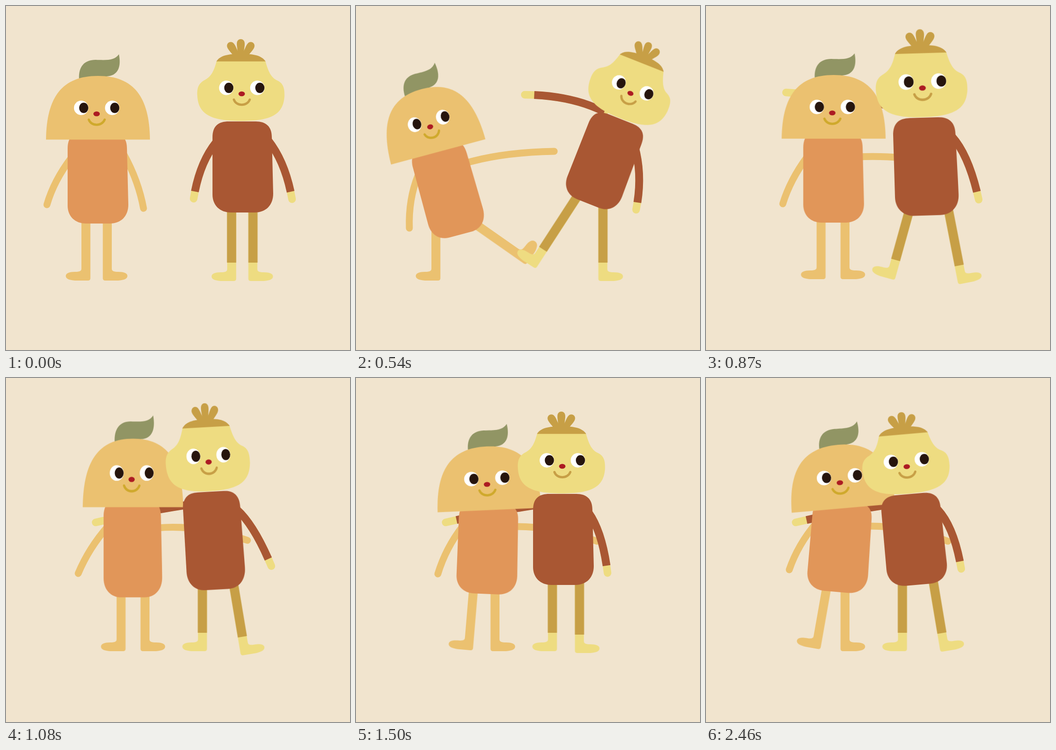
An HTML page without scripts for the animation above (2700 ms loop, 748 by 748 pixels).

```html
<!DOCTYPE html>
<html lang="en">
<head>
<meta charset="utf-8">
<title>Two friends</title>
<style>
html, body { margin: 0; width: 100%; height: 100%; overflow: hidden; background: #f1e4ce; }
svg { display: block; width: 100%; height: 100%; }

.mango { color: #cfa92c; fill: #ebc170; }
.onion { color: #c79f46; fill: #eedc81; }
.arm { fill: none; stroke: #ebc170; stroke-width: 15; stroke-linecap: round; }
.hand { stroke: #eedc81; stroke-width: 16.5; }
.sleeve { stroke: #a95733; stroke-width: 17; stroke-linecap: butt; stroke-dasharray: 88.5 100; }

.move { animation: 2.7s ease-in-out infinite; }
.m-body { animation-name: m-body; transform-origin: 200px 473px; }
.m-head { animation-name: m-head; transform-origin: 200px 290px; }
.m-leg-l { animation-name: m-leg-l; transform-origin: 173.5px 455px; }
.m-leg-r { animation-name: m-leg-r; transform-origin: 220.5px 455px; }
.m-arm-l { animation-name: m-arm-l; }
.m-arm-r { animation-name: m-arm-r; }
.o-body { animation-name: o-body; transform-origin: 515px 449px; }
.o-leg-l { animation-name: o-leg-l; transform-origin: 490.5px 455px; }
.o-leg-r { animation-name: o-leg-r; transform-origin: 537.5px 455px; }
.o-arm-l { animation-name: o-arm-l; }
.o-arm-r { animation-name: o-arm-r; }

@keyframes m-body {
  0% { transform: translate(0, 0) rotate(0deg) scale(1, 1); }
  11.1% { transform: translate(8.6px, 24px) rotate(-15deg) scale(.905, 1.028); }
  20% { transform: translate(27px, 24px) rotate(-15deg) scale(.94, 1.02); }
  32.2% { transform: translate(77.5px, -2px) rotate(0deg) scale(1, 1); }
  40% { transform: translate(76px, 4px) rotate(0deg) scale(.966, 1.075); }
  47% { transform: translate(77px, -2px) rotate(0deg) scale(1, 1); animation-timing-function: ease-in; }
  55.6% { transform: translate(83px, -3.5px) rotate(2.3deg) scale(1, 1); animation-timing-function: ease-out; }
  64%, 100% { transform: translate(83px, -8px) rotate(5deg) scale(1, 1); }
}
@keyframes m-head {
  0%, 47% { transform: rotate(0deg); animation-timing-function: ease-in; }
  55.6% { transform: rotate(-4.8deg); animation-timing-function: ease-out; }
  64%, 100% { transform: rotate(-10deg); }
}
@keyframes m-leg-l {
  0%, 20% { transform: translate(0, 0) rotate(0deg); }
  32.2%, 47% { transform: translate(76.5px, -3px) rotate(0deg); }
  47% { animation-timing-function: ease-in; }
  55.6% { transform: translate(82.5px, -5px) rotate(4.8deg); animation-timing-function: ease-out; }
  64%, 100% { transform: translate(90px, -6.5px) rotate(10deg); }
}
@keyframes m-leg-r {
  0% { transform: translate(0, 0) rotate(0deg) scale(1, 1); }
  11.1% { transform: translate(0, 2px) rotate(-61deg) scale(1, 1.3); }
  20% { transform: translate(3.3px, -6px) rotate(-55deg) scale(1, 1.3); }
  32.2%, 100% { transform: translate(82px, -3px) rotate(0deg) scale(1, 1); }
}
@keyframes m-arm-l {
  0% { d: path("M142 330Q104 380 89 432"); }
  11.1% { d: path("M122 362Q100 412 101 481"); }
  20% { d: path("M135 368Q114 420 116 483"); }
  32.2% { d: path("M220 328Q183 378 167 430"); }
  40% { d: path("M222 322Q180 370 157 425"); }
  43.5% { d: path("M222 322Q175 360 144 408"); }
  55.6% { d: path("M232 322Q195 370 178 426"); }
  64%, 100% { d: path("M240 315Q200 362 181 417"); }
}
@keyframes m-arm-r {
  0% { d: path("M256 322Q288 380 299 440"); }
  11.1% { d: path("M215 343Q300 320 400 323"); }
  20% { d: path("M240 341Q320 318 431 316"); }
  32.2% { d: path("M330 328Q410 324 500 340"); }
  40% { d: path("M328 326Q420 318 525 353"); }
  55.6% { d: path("M345 323Q430 322 524 355"); }
  64%, 100% { d: path("M350 322Q430 320 526 355"); }
}
@keyframes o-body {
  0% { transform: translate(0, 0) rotate(0deg) scale(1, 1); animation-timing-function: ease-in; }
  11.1% { transform: translate(-1px, -2px) rotate(7.8deg) scale(.98, 1); animation-timing-function: ease-out; }
  17.2% { transform: translate(-7px, -18px) rotate(23deg) scale(.96, .995); }
  20% { transform: translate(-10.5px, -19.5px) rotate(21.6deg) scale(.96, .995); }
  32.2% { transform: translate(-33.5px, 6.5px) rotate(-1.7deg) scale(1.05, 1.075); }
  40% { transform: translate(-56.5px, 11px) rotate(-3.2deg) scale(.965, 1.077); }
  52%, 60% { transform: translate(-64px, 1px) rotate(0deg) scale(1, 1); }
  78%, 100% { transform: translate(-53.5px, .5px) rotate(-5deg) scale(1, 1); }
}
@keyframes o-leg-l {
  0% { transform: translate(0, 0) rotate(0deg) scale(1, 1); animation-timing-function: ease-in; }
  11.1% { transform: translate(-4.5px, -5px) rotate(1.6deg) scale(1, 1); }
  20% { transform: translate(-22.4px, -21px) rotate(33deg) scale(1, 1.1); }
  32.2% { transform: translate(-48.8px, -9px) rotate(15.5deg) scale(1, 1.07); }
  40%, 100% { transform: translate(-63.5px, -4px) rotate(0deg) scale(1, 1); }
}
@keyframes o-leg-r {
  0%, 20% { transform: translate(0, 0) rotate(0deg); }
  32.2% { transform: translate(-6px, 8px) rotate(-11deg); }
  40% { transform: translate(-40px, 6px) rotate(-9.5deg); }
  52%, 60% { transform: translate(-51px, 0) rotate(0deg); }
  78%, 100% { transform: translate(-41px, -2px) rotate(-9.5deg); }
}
@keyframes o-arm-l {
  0% { d: path("M457 296Q420 342 408 419"); animation-timing-function: ease-in; }
  11.1% { d: path("M478 272Q430 303 391 359"); animation-timing-function: ease-out; }
  20% { d: path("M540 230Q468 194 367 193"); }
  32.2% { d: path("M440 225Q300 195 174 188"); }
  40%, 100% { d: path("M400 275Q300 290 195 314"); }
}
@keyframes o-arm-r {
  0% { d: path("M570 292Q608 340 622 420"); animation-timing-function: ease-in; }
  11.1% { d: path("M588 300Q618 350 621 432"); animation-timing-function: ease-out; }
  20% { d: path("M606 305Q624 370 609 443"); }
  32.2% { d: path("M535 284Q572 325 593 421"); }
  40% { d: path("M502 286Q540 320 577 409"); }
  43.5% { d: path("M505 285Q555 310 594 395"); }
  54%, 60% { d: path("M506 293Q536 335 547 424"); }
  78%, 100% { d: path("M504 286Q540 325 555 415"); }
}
</style>
</head>
<body>
<svg viewBox="0 0 748 748">
  <defs>
    <path id="leg" d="M164 415H183.500V592Q183.500 597 178 597H150C137 596 130 593 130 587C130 581 138 578 150 578C159 578 164 577 164 571Z"/>
    <g id="sock-leg">
      <use href="#leg" x="317" y="1"/>
      <path d="M480.500 415h20v143h-20z" fill="#c79f46"/>
    </g>
    <path id="torso" d="M134 310C134 285 146 275 170 275H228C250 275 263 286 263 309L266 432C266 457 250 473 226 473H174C150 473 134 457 134 434Z"/>
    <g id="face">
      <g fill="#fff"><circle cx="163.500" cy="221.500" r="15.700"/><circle cx="231" cy="221.500" r="15.700"/></g>
      <g fill="#26150d"><ellipse cx="169" cy="221.500" rx="10" ry="11.300"/><ellipse cx="236.500" cy="221.500" rx="10" ry="11.300"/></g>
      <ellipse cx="197" cy="234.500" rx="7" ry="5.200" fill="#ac1b22"/>
      <path d="M180 247C185 262 209 262 214.500 247" fill="none" stroke="currentColor" stroke-width="5" stroke-linecap="round"/>
    </g>
    <path id="tuft" d="M-6.500 0C-6 -12 -9 -21 -8.500 -28C-8 -40 8 -40 8.500 -28C9 -21 6 -12 6.500 0Z"/>
  </defs>

  <path class="arm move m-arm-r"/>
  <path class="arm hand move o-arm-l"/>
  <path class="arm sleeve move o-arm-l" pathLength="100"/>

  <g class="mango">
    <g class="move m-leg-l"><use href="#leg"/></g>
    <g class="move m-leg-r"><use href="#leg" transform="translate(394) scale(-1 1)"/></g>
    <path class="arm move m-arm-l"/>
    <g class="move m-body">
      <use href="#torso" fill="#e19659"/>
      <g class="move m-head">
        <path d="M159 160C157 131 171 117 195 117C222 118 236 118 245.500 105C251 132 244 152 218 153L190 165Z" fill="#919564"/>
        <path d="M87 290.500C88 198 122 152 200 152C278 152 312 198 313 290.500Z"/>
        <use href="#face"/>
      </g>
    </g>
  </g>

  <g class="onion">
    <g class="move o-leg-l"><use href="#sock-leg"/></g>
    <g class="move o-leg-r"><use href="#sock-leg" transform="translate(1027.500) scale(-1 1)"/></g>
    <path class="arm hand move o-arm-r"/>
    <path class="arm sleeve move o-arm-r" pathLength="100"/>
    <g class="move o-body">
      <use href="#torso" x="315" y="-24" fill="#a95733"/>
      <path d="M458 120H564C570 141 576 156 590 162C603 168 606 179 605.500 196C603 236 577 250 511 250C445 250 418 235 416 195C415 178 419 168 432 161C447 153 452 141 458 120Z"/>
      <g fill="#c79f46">
        <path d="M457.500 120.500C465 108 482 104 511 104C540 104 556 108 564.500 120.500Z"/>
        <use href="#tuft" transform="translate(510.500 109)"/>
        <use href="#tuft" transform="translate(504 111) rotate(-32)"/>
        <use href="#tuft" transform="translate(517 111) rotate(32)"/>
      </g>
      <use href="#face" x="315.500" y="-43.500"/>
    </g>
  </g>
</svg>
</body>
</html>
```
